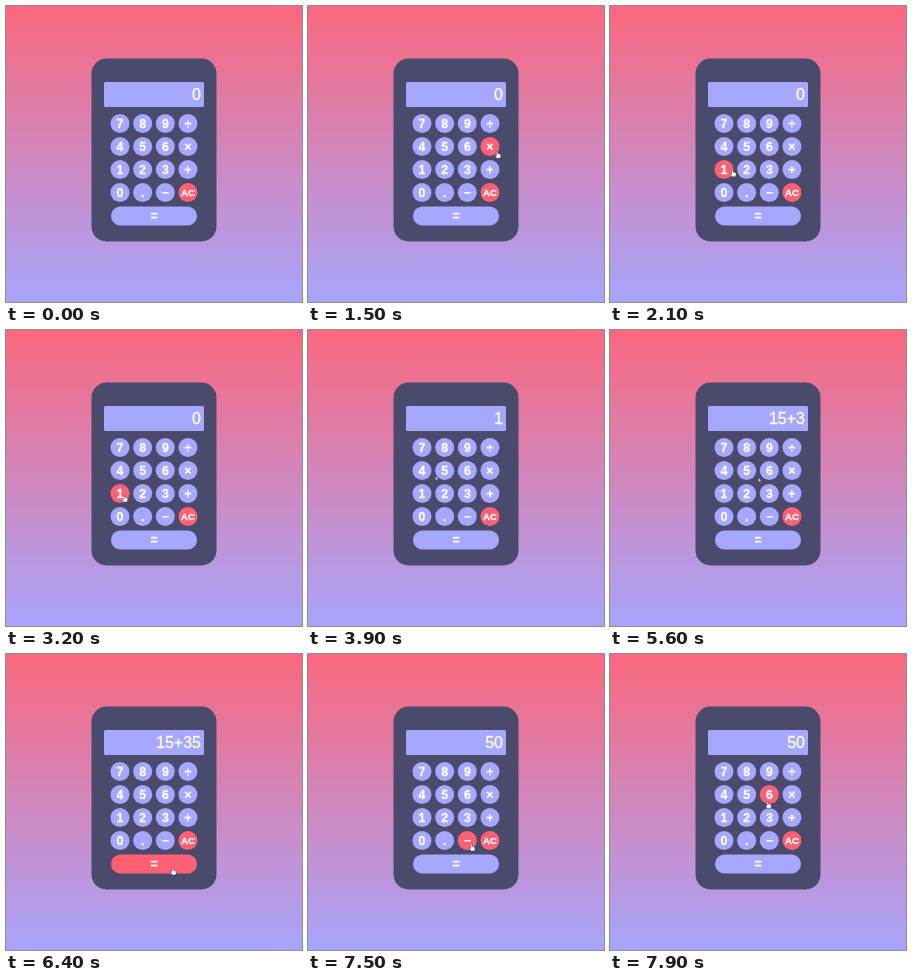
Write an HTML page that moves like this. It is 296 by 296 pixels and loops after 8 s.

```html
<!DOCTYPE html>
<html lang="en">
<head>
<meta charset="utf-8">
<title>Calculator</title>
<style>
  html, body { margin: 0; height: 100%; overflow: hidden; }
  svg { display: block; width: 100vw; height: 100vh; }
  text { font-family: "Liberation Sans", Arial, sans-serif; fill: #fff; stroke: #fff; stroke-width: .3; }
  .key { fill: #a6a7ff; }
  .key.hot { fill: #ff6074; }
  .label { font-weight: bold; font-size: 12.3px; text-anchor: middle; }
  .label.small { font-size: 9.6px; }
  #cursor path { fill: #fff; stroke: #25253a; stroke-width: .55; stroke-linejoin: round; }
</style>
</head>
<body>
<svg viewBox="0 0 296 296">
  <defs>
    <linearGradient id="sky" x2="0" y2="1">
      <stop stop-color="#fa687d"/>
      <stop offset="1" stop-color="#a8a5fc"/>
    </linearGradient>
  </defs>
  <rect width="296" height="296" fill="url(#sky)"/>
  <rect x="85.5" y="52.5" width="125" height="183" rx="15" fill="#4a4a6c"/>
  <rect class="key" x="98" y="76" width="100" height="25" rx="1.5"/>
  <text id="display" x="195" y="94.3" font-size="16" text-anchor="end">0</text>
  <g id="keys"></g>
  <g id="cursor">
    <path id="hand" d="M-.9 .4Q0-.6 .9 .4V3Q2 2.5 2.4 3.4Q3.5 3 3.8 4Q4.8 3.8 4.8 5V6.3L3.8 9H-.6L-2.8 5.8Q-2.6 4.5-.9 5.6Z"/>
    <path id="arrow" d="M0 0V5.6L1.3 4.5L2.2 6.5L3.1 6.1L2.3 4.2H4Z"/>
  </g>
</svg>
<script>
const LOOP = 8000, STEP = 100, KEY = 19;
const $ = id => document.getElementById(id);

function add(tag, attrs, text = '') {
  const el = document.createElementNS('http://www.w3.org/2000/svg', tag);
  for (const name in attrs) el.setAttribute(name, attrs[name]);
  el.textContent = text;
  $('keys').append(el);
  return el;
}

const keys = {};
function addKey(label, cx, cy, width = KEY) {
  const always = label === 'AC';
  const el = add('rect', {
    class: 'key', x: cx - width / 2, y: cy - KEY / 2, width, height: KEY, rx: KEY / 2
  });
  add('text', {
    class: always ? 'label small' : 'label', x: cx, y: cy + (always ? 3.4 : 4.4)
  }, label);
  keys[label] = { el, cx, cy, half: (width - KEY) / 2, always };
}

['7', '8', '9', '÷', '4', '5', '6', '×', '1', '2', '3', '+', '0', '.', '−', 'AC']
  .forEach((label, i) => addKey(label, 114 + i % 4 * 22.65, 117.5 + (i >> 2) * 23));
addKey('=', 148, 210, 86);

// Each visit: key, pointer offset from its centre, departure and arrival times
const visits = [
  ['1', 4, 1.5, 1400, 2300],
  ['5', -8, 3, 3700, 4000],
  ['+', -6.5, .5, 4400, 4900],
  ['3', -1.5, -3.5, 5100, 5300],
  ['5', 8.5, 3, 5400, 5800],
  ['=', 18.5, 4, 6000, 6400],
  ['6', -1.7, 7, 7400, 7900]
].map(([label, dx, dy, depart, arrive]) =>
  ({ label, x: keys[label].cx + dx, y: keys[label].cy + dy, depart, arrive }));

function pointerAt(t) {
  let x = 208, y = 140;
  for (const v of visits) {
    const k = Math.min(1, Math.max(0, (t - v.depart) / (v.arrive - v.depart)));
    const ease = 1 - (1 - k) ** 2;
    x += (v.x - x) * ease;
    y += (v.y - y) * ease;
  }
  return [x, y];
}

// A key is pressed one step before the pointer leaves it
function displayAt(t) {
  let shown = '';
  visits.forEach(({ label }, i) => {
    if (t < (visits[i + 1]?.depart ?? Infinity) - STEP) return;
    shown = label === '='
      ? String(shown.split('+').reduce((sum, n) => sum + +n, 0))
      : shown + label;
  });
  return shown || '0';
}

function draw(now) {
  const t = Math.floor(now % LOOP / STEP) * STEP;
  const visible = t > visits[0].depart;
  const [x, y] = pointerAt(t);
  let over = false;
  for (const k of Object.values(keys)) {
    const dx = Math.max(0, Math.abs(x - k.cx) - k.half);
    const hit = visible && Math.hypot(dx, y - k.cy) < KEY / 2;
    over ||= hit;
    k.el.classList.toggle('hot', hit || k.always);
  }
  $('cursor').setAttribute('transform', `translate(${x} ${y}) scale(.78)`);
  $('hand').style.display = visible && over ? '' : 'none';
  $('arrow').style.display = visible && !over ? '' : 'none';
  $('display').textContent = displayAt(t);
}

const start = performance.now();
function tick() {
  draw(performance.now() - start);
  requestAnimationFrame(tick);
}
tick();
</script>
</body>
</html>
```
